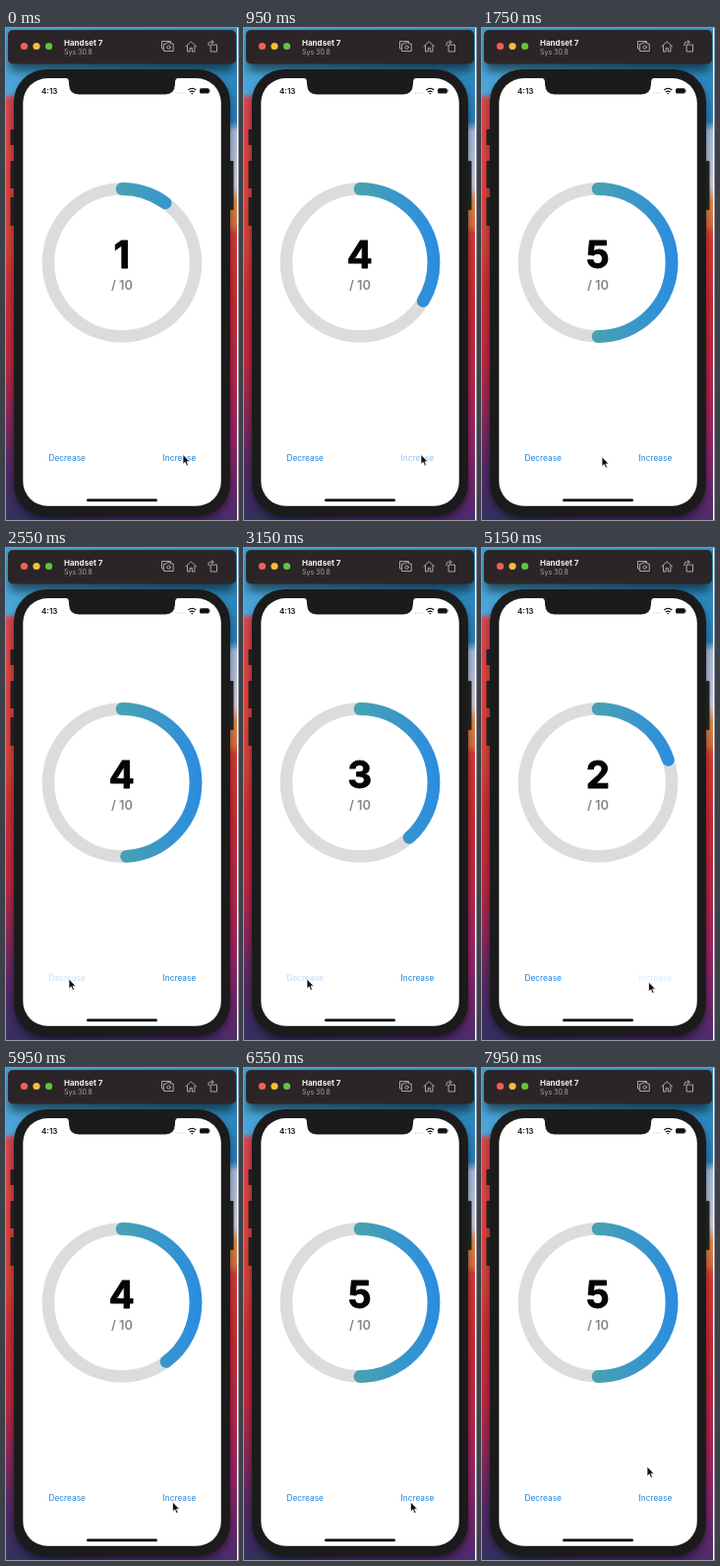
These frames come from a looping animation (236x500 px, 8 s). An HTML page:

```html
<!DOCTYPE html>
<html lang="en">
<head>
<meta charset="utf-8">
<title>Progress ring</title>
<style>
html, body { margin: 0; width: 100%; height: 100%; overflow: hidden; }
svg { display: block; width: 236px; height: 500px; font-family: Inter, Roboto, sans-serif; }
.action { font-size: 8.3px; fill: #1985e2; }
.icon { fill: none; stroke: #aaa5a7; stroke-width: 1; stroke-linejoin: round; stroke-linecap: round; }
</style>
</head>
<body>
<svg viewBox="0 0 236 500">
  <defs>
    <linearGradient id="left" x2="0" y2="1">
      <stop offset="0" stop-color="#3c9bcb"/>
      <stop offset=".132" stop-color="#4ba6da"/>
      <stop offset=".145" stop-color="#d8484f"/>
      <stop offset=".3" stop-color="#e0423e"/>
      <stop offset=".44" stop-color="#d2443a"/>
      <stop offset=".52" stop-color="#cf2f36"/>
      <stop offset=".68" stop-color="#c02740"/>
      <stop offset=".78" stop-color="#8f2758"/>
      <stop offset=".88" stop-color="#582a66"/>
      <stop offset="1" stop-color="#33305f"/>
    </linearGradient>
    <linearGradient id="right" x2="0" y2="1">
      <stop offset="0" stop-color="#2c8fc2"/>
      <stop offset=".19" stop-color="#2b7fb6"/>
      <stop offset=".21" stop-color="#a9bedd"/>
      <stop offset=".32" stop-color="#c9c6d8"/>
      <stop offset=".35" stop-color="#dc8a4c"/>
      <stop offset=".4" stop-color="#d9713f"/>
      <stop offset=".42" stop-color="#d63b36"/>
      <stop offset=".55" stop-color="#d02c35"/>
      <stop offset=".72" stop-color="#b8274e"/>
      <stop offset=".84" stop-color="#98246c"/>
      <stop offset="1" stop-color="#4b2c6c"/>
    </linearGradient>
    <linearGradient id="across">
      <stop offset=".2" stop-color="#000"/>
      <stop offset=".8" stop-color="#fff"/>
    </linearGradient>
    <mask id="blend"><rect width="236" height="500" fill="url(#across)"/></mask>
    <linearGradient id="sweep" gradientUnits="userSpaceOnUse" x1="37" x2="199" y1="0" y2="0">
      <stop offset="0" stop-color="#62b586"/>
      <stop offset=".5" stop-color="#47a1b3"/>
      <stop offset="1" stop-color="#2a8ce2"/>
    </linearGradient>
    <filter id="soft" x="-20%" y="-50%" width="140%" height="200%">
      <feGaussianBlur stdDeviation="4"/>
    </filter>
  </defs>

  <rect width="236" height="500" fill="url(#left)"/>
  <rect width="236" height="500" fill="url(#right)" mask="url(#blend)"/>
  <g filter="url(#soft)" opacity=".5">
    <rect x="4" y="10" width="228" height="34" rx="5"/>
    <rect x="8" y="48" width="220" height="452" rx="33"/>
  </g>
  <rect x="235" width="1" height="500" fill="#fff"/>

  <rect x="2" y="2" width="232" height="34.5" rx="5" fill="#2c2527"/>
  <circle cx="18.5" cy="18.5" r="3.6" fill="#f45f55"/>
  <circle cx="31" cy="18.5" r="3.6" fill="#f5bd3c"/>
  <circle cx="43.6" cy="18.5" r="3.6" fill="#5fc43f"/>
  <text x="59" y="18" font-size="8" font-weight="700" fill="#f4f2f3">Handset 7</text>
  <text x="59" y="26.5" font-size="7" fill="#aaa4a6">Sys 30.8</text>
  <g class="icon">
    <path d="M160 21h-1.5v-7.5h9V15"/>
    <path d="M161 16h2l1-1.2h3l1 1.2h2.2v7.5H161z"/>
    <circle cx="165.6" cy="19.6" r="1.7"/>
    <path d="M182.8 18.8l5.4-5 5.4 5M184.5 18v6h2.6v-3.6h2.2V24h2.6v-6"/>
    <path d="M208.5 17h6v7h-6zM206 18v-2q0-1.8 2-1.8h3M209.3 12.4l1.8 1.8-1.8 1.8"/>
  </g>

  <g fill="#202022">
    <rect x="4.5" y="103" width="5" height="16" rx="1"/>
    <rect x="4.5" y="135" width="5" height="28" rx="1"/>
    <rect x="4.5" y="172" width="5" height="29" rx="1"/>
    <rect x="227" y="135" width="4.5" height="50" rx="1"/>
  </g>
  <rect x="8" y="42" width="220" height="454" rx="33" fill="#1b1b1c"/>
  <rect x="17.3" y="51" width="201.5" height="434.7" rx="25" fill="#fff"/>
  <path d="M60 50.5Q64 51 64 55v2Q64.500 67.500 74 67.500H162Q171.500 67.500 172 57v-2Q172 51 176 50.500z" fill="#1b1b1c"/>
  <text x="36" y="66.500" font-size="8" font-weight="600" fill="#111">4:13</text>
  <g fill="#bbb">
    <circle cx="174.500" cy="66" r=".6"/><circle cx="177" cy="66" r=".6"/>
    <circle cx="179.500" cy="66" r=".6"/><circle cx="182" cy="66" r=".6"/>
  </g>
  <g fill="none" stroke="#111" stroke-width="1.300">
    <path d="M185.300 63q4-3.300 8 0M187 65q2.300-1.900 4.600 0"/>
    <path d="M188.600 66.600h1.400"/>
  </g>
  <rect x="197" y="61.300" width="9.800" height="5.200" rx="1.500" fill="#111"/>
  <rect x="207.300" y="63" width=".8" height="1.800" fill="#777"/>

  <circle cx="118" cy="238.500" r="75" fill="none" stroke="#dcdcdc" stroke-width="12.500"/>
  <path id="arc" d="M118 163.500a75 75 0 0 1 0 150a75 75 0 0 1 0-150" pathLength="100"
    fill="none" stroke="url(#sweep)" stroke-width="12.800" stroke-linecap="round"/>
  <text id="count" x="117.800" y="244.300" font-size="38.500" font-weight="700" text-anchor="middle"
    fill="#050505" stroke="#050505" stroke-width=".9" stroke-linejoin="round"></text>
  <text x="118" y="266" font-size="12.800" font-weight="600" text-anchor="middle" fill="#848484">/ 10</text>
  <text id="dec" class="action" x="43.500" y="440">Decrease</text>
  <text id="inc" class="action" x="159.600" y="440">Increase</text>
  <rect x="82" y="478.500" width="72" height="2.800" rx="1.400" fill="#050505"/>

  <path id="cursor" d="M0 0v9.800l2.300-2 1.500 3.600 1.700-.7-1.500-3.500h3z" fill="#111" stroke="#fff" stroke-width=".7"/>
</svg>
<script>
const LOOP = 8000, MOVE = 350;
const $ = id => document.getElementById(id);

// [time, change in value]
const taps = [
  [240, 1], [520, 1], [800, 1], [1120, 1],
  [2472, -1], [3050, -1], [3626, -1],
  [5210, 1], [5640, 1], [6080, 1]
];

// [time, x, y] of the pointer tip
const path = [
  [0, 180, 433.5], [1300, 180, 433.5], [2200, 64, 438], [3950, 64, 438],
  [4850, 169.5, 441], [6650, 169.5, 441], [7900, 168, 405]
];

const clamp = v => Math.min(1, Math.max(0, v));
const ease = v => v < .5 ? 2 * v * v : 1 - 2 * (1 - v) ** 2;

function sample(t) {
  if (t < 100) return 0;
  if (t < 150) return 100;
  return 150 + Math.floor((t - 150) / 200) * 200;
}

function pointer(t) {
  const i = path.findIndex(p => p[0] > t);
  if (i < 0) return path[path.length - 1].slice(1);
  const [t0, x0, y0] = path[i - 1], [t1, x1, y1] = path[i];
  const k = ease((t - t0) / (t1 - t0));
  return [x0 + (x1 - x0) * k, y0 + (y1 - y0) * k];
}

function opacity(t, step) {
  let value = 1;
  for (const [at, change] of taps) {
    const age = t - at;
    if (change === step && age > -90)
      value = Math.min(value, .16 + .84 * ease(clamp(age / MOVE)));
  }
  return value;
}

function draw(now) {
  const t = sample(now % LOOP);
  let count = 1, level = 1;
  for (const [at, change] of taps) {
    if (t >= at) count += change;
    level += change * ease(clamp((t - at) / MOVE));
  }
  $("arc").setAttribute("stroke-dasharray", `${level * 10} 200`);
  $("count").textContent = count;
  $("inc").style.opacity = opacity(t, 1);
  $("dec").style.opacity = opacity(t, -1);
  $("cursor").setAttribute("transform", `translate(${pointer(t)})`);
}

const start = performance.now();
function tick() {
  draw(performance.now() - start);
  requestAnimationFrame(tick);
}
tick();
</script>
</body>
</html>
```
